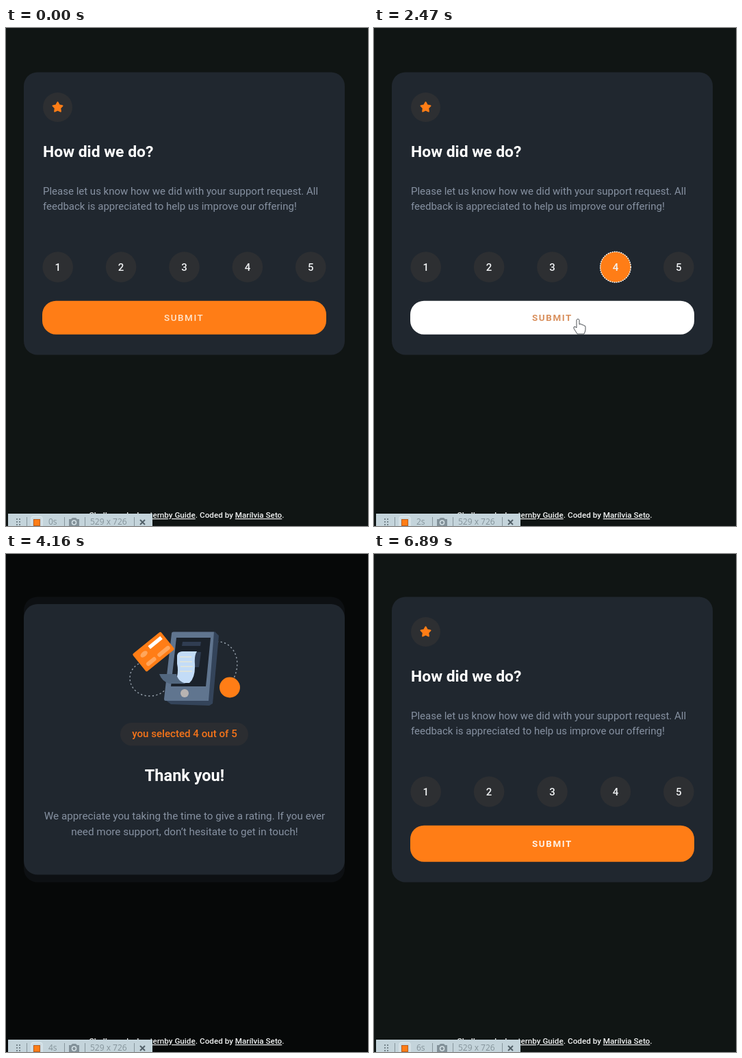
Recreate the animation shown at these times as an HTML page. Size 529x726 px, loop 7.15 s.

```html
<!DOCTYPE html>
<html lang="en">
<head>
<meta charset="utf-8">
<title>Rating card</title>
<style>
  html, body { margin: 0; width: 100%; height: 100%; overflow: hidden; background: #101514; }
  svg { display: block; width: 529px; height: 726px; font: 15px Roboto, sans-serif; }
  .panel { fill: #20272f; }
  .title { font-weight: 700; font-size: 22.9px; fill: #fff; }
  .copy { fill: #8691a1; }
  .mid { text-anchor: middle; }
  .title.mid { font-size: 23.5px; }
  .copy.mid { font-size: 15.25px; }
  .num { font-weight: 500; fill: #f2f4f6; text-anchor: middle; }
  #label { font-size: 13.4px; letter-spacing: 1.6px; }
  .foot { font-size: 11.7px; font-weight: 500; fill: #f0f2f2; }
  .foot tspan { text-decoration: underline; }
  .bar { font: 12px "Open Sans", sans-serif; fill: #84939a; }
</style>
</head>
<body>
<svg viewBox="0 0 529 726">
  <rect width="529" height="726" fill="#101514"/>

  <rect id="card" class="panel" x="26" width="469" rx="20"/>
  <g id="form">
    <circle cx="75.5" cy="115.5" r="21.5" fill="#2d2f32"/>
    <path id="star" fill="#ff7d16" stroke="#ff7d16" stroke-width="2" stroke-linejoin="round"/>
    <text class="title" x="54" y="188">How did we do?</text>
    <text class="copy" x="54" y="243">Please let us know how we did with your support request. All</text>
    <text class="copy" x="54" y="265">feedback is appreciated to help us improve our offering!</text>
    <g id="scores"></g>
  </g>
  <rect id="submit" x="53" width="415" rx="20"/>
  <text id="label" x="231" y="427">SUBMIT</text>

  <g id="thanks">
    <rect width="529" height="726" fill="#000" opacity=".6"/>
    <rect class="panel" x="26" y="73" width="469" height="394.5" rx="20"/>

    <g fill="none" stroke="#98a3ae" stroke-width="1.4" stroke-dasharray="2.2 3.4">
      <path d="M194 160C171 172 180 207 210 207C222 207 230 202 235 195"/>
      <path d="M308 128C328 126 347 150 333 181"/>
    </g>
    <path d="M305 113L311 119L302 218L297 221L241 219L232 212Z" fill="#34445a"/>
    <path d="M245 113.500H304L296 214H233Q231 214 231 211L242 116Q242 113.500 245 113.500Z" fill="#60758f"/>
    <path d="M249 122H299L292 193H241Z" fill="#1b222b"/>
    <path d="M258 128H285L284 134H257Z" fill="#303d52"/>
    <path d="M272 143H285L282 165H270Z" fill="#2f3c50"/>
    <circle cx="261" cy="203" r="6" fill="#b8b4b2"/>
    <path d="M250 148Q251 142 258 142H279Q275 148 276 160Q277 180 268 188H247Q253 174 250 160Z" fill="#c3dcf7"/>
    <path d="M254 150H271M254 157H272M255 164H273M254 171H272" stroke="#e6e6d8" stroke-width="1.4"/>
    <path d="M224 175H249Q251 186 263 189H239Q228 186 224 175Z" fill="#52677f"/>
    <g transform="translate(215.5 142.5) rotate(-39)">
      <rect x="-26.500" y="-16.500" width="53" height="33" rx="2" fill="#ff7d16"/>
      <rect x="-1" y="-11.500" width="23" height="5.500" fill="#fff"/>
      <g fill="#ffa65c">
        <ellipse cx="-13" cy="-6" rx="6" ry="3.600"/>
        <rect x="-20" y="6" width="17" height="6" rx="3"/>
        <rect x="1" y="6" width="22" height="6" rx="3"/>
      </g>
    </g>
    <circle cx="327" cy="194.500" r="15" fill="#ff7d16"/>

    <rect x="167" y="246" width="187" height="33.500" rx="16.750" fill="#2b2d31"/>
    <text class="mid" x="261" y="267" font-size="15.1" font-weight="500" fill="#f5741a">you selected 4 out of 5</text>
    <text class="title mid" x="261" y="331">Thank you!</text>
    <text class="copy mid" x="261" y="387">We appreciate you taking the time to give a rating. If you ever</text>
    <text class="copy mid" x="261" y="410">need more support, don’t hesitate to get in touch!</text>
  </g>

  <text class="foot" x="280" y="714" text-anchor="end">Challenge by <tspan>Lanternby Guide</tspan>.</text>
  <text class="foot" x="283" y="714">Coded by <tspan>Marílvia Seto</tspan>.</text>

  <g id="pointer" stroke="#20262d" stroke-width=".8" stroke-linejoin="round" fill="#fff">
    <path id="hand" d="M-2 1.500Q0-1.500 2 1.500V8L4 7.500Q5.500 7.500 6 9Q8 8 9 10Q11 9.500 11 12V16Q10.500 19 9 22H-1L-6 14Q-7 11-4 11.500L-2 13Z"/>
    <path id="arrow" d="M0 0V16L4 12.500L6.500 18L9 17L6.500 11.500H11.500Z"/>
  </g>

  <g class="bar">
    <rect id="barBack" x="3" y="708" height="18" fill="#c4d4db"/>
    <path d="M16 715V725M20 715V725" stroke="#75848b" stroke-width="2" stroke-dasharray="2 2"/>
    <path d="M30.500 713V726" stroke="#87969d"/>
    <rect x="37" y="712.500" width="16" height="16" rx="2" fill="#cbdae1" stroke="#e2edf1"/>
    <rect x="40.500" y="716.500" width="9" height="9" fill="#ff7d16" stroke="#b95d1b"/>
    <text id="seconds" x="62" y="724"></text>
    <g id="barRest">
      <path d="M85.500 713V726M115.500 713V726M187.500 713V726" stroke="#87969d"/>
      <path d="M92 716H95L97 714H102L104 716H107V726H92Z" fill="#829199"/>
      <circle cx="99.500" cy="721" r="3" fill="none" stroke="#d6e2e7" stroke-width="1.500"/>
      <text x="123" y="724">529 x 726</text>
      <path d="M196 717L203 724M203 717L196 724" stroke="#536169" stroke-width="2"/>
    </g>
  </g>
</svg>
<script>
  const LOOP = 7150, TICK = 130;
  const OPEN = 3120, CLOSE = 5200;
  const byId = id => document.getElementById(id);
  const set = (node, attrs) => {
    for (const name in attrs) node.setAttribute(name, attrs[name]);
  };
  const show = (id, on) => byId(id).style.display = on ? "" : "none";

  // time, x, y of the pointer tip
  const path = [
    [260, 490, 425], [390, 478, 390], [520, 457, 360], [780, 438, 352],
    [910, 401, 357], [1040, 372, 353], [1430, 356.5, 351], [1950, 356.5, 351],
    [2080, 352, 368], [2210, 335, 396], [2470, 298, 424], [2860, 284, 435], [OPEN, 284, 435]
  ];

  function pointAt(t) {
    const i = path.findIndex(p => p[0] >= t);
    if (i < 1) return path[0].slice(1);
    const [a, b] = [path[i - 1], path[i]];
    const k = (t - a[0]) / (b[0] - a[0]);
    return [a[1] + (b[1] - a[1]) * k, a[2] + (b[2] - a[2]) * k];
  }

  const starPoints = Array.from({ length: 10 }, (_, i) => {
    const r = i % 2 ? 3.9 : 7.4, a = i * Math.PI / 5 - Math.PI / 2;
    return [75.5 + r * Math.cos(a), 115.7 + r * Math.sin(a)].map(v => v.toFixed(2));
  });
  byId("star").setAttribute("d", "M" + starPoints.join("L") + "Z");

  byId("scores").innerHTML = [1, 2, 3, 4, 5].map(n => {
    const x = 75.7 + (n - 1) * 92.4;
    return `<circle cx="${x}" cy="348.5" r="22.3"/><text class="num" x="${x}" y="354">${n}</text>`;
  }).join("");
  const discs = [...byId("scores").querySelectorAll("circle")];

  function scoreColor(n, t) {
    if (n === 5 && t >= 520 && t < 1040) return "#929ca9";
    if (n === 4 && t >= 1040 && t < 1430) return "#929ca9";
    if (n === 4 && t >= 1430 && t <= OPEN) return "#ff7d16";
    return "#2d2f32";
  }

  function draw(t) {
    const tall = t > OPEN;
    const grow = tall ? 2 : 0;
    set(byId("card"), { y: 64.5 - grow, height: 412 + 2 * grow });
    set(byId("form"), { transform: `translate(0 ${-grow})` });
    set(byId("submit"), { y: 397.7 - grow, height: 49 + 2 * grow });

    discs.forEach((disc, i) => {
      const picked = i === 3 && t >= 1430 && !tall;
      set(disc, {
        fill: scoreColor(i + 1, t),
        stroke: picked ? "#fff" : "none",
        "stroke-width": 1.4,
        "stroke-dasharray": "2 1.2"
      });
    });

    const lit = t >= 2210 && !tall;
    set(byId("submit"), { fill: lit ? "#fff" : "#ff7d16" });
    set(byId("label"), {
      fill: lit ? "#d98f5c" : tall ? "#fff3e8" : "#ffe6d0",
      "font-weight": tall || lit ? 600 : 500
    });

    const thanks = t >= OPEN && t < CLOSE;
    show("thanks", thanks);
    byId("thanks").style.opacity = Math.min(1, (t - OPEN + TICK) / 650);

    show("pointer", t >= 260 && t <= OPEN);
    const [x, y] = pointAt(t);
    set(byId("pointer"), { transform: `translate(${x} ${y})` });
    show("arrow", t < 520);
    show("hand", t >= 520);

    const second = Math.floor(t / 1040);
    const narrow = second === 1 ? 3 : 0;
    byId("seconds").textContent = second + "s";
    set(byId("barBack"), { width: 211 - narrow });
    set(byId("barRest"), { transform: `translate(${-narrow} 0)` });
  }

  const start = performance.now();
  function frame() {
    const t = (performance.now() - start) % LOOP;
    draw(Math.floor(t / TICK) * TICK);
    requestAnimationFrame(frame);
  }
  frame();
</script>
</body>
</html>
```
